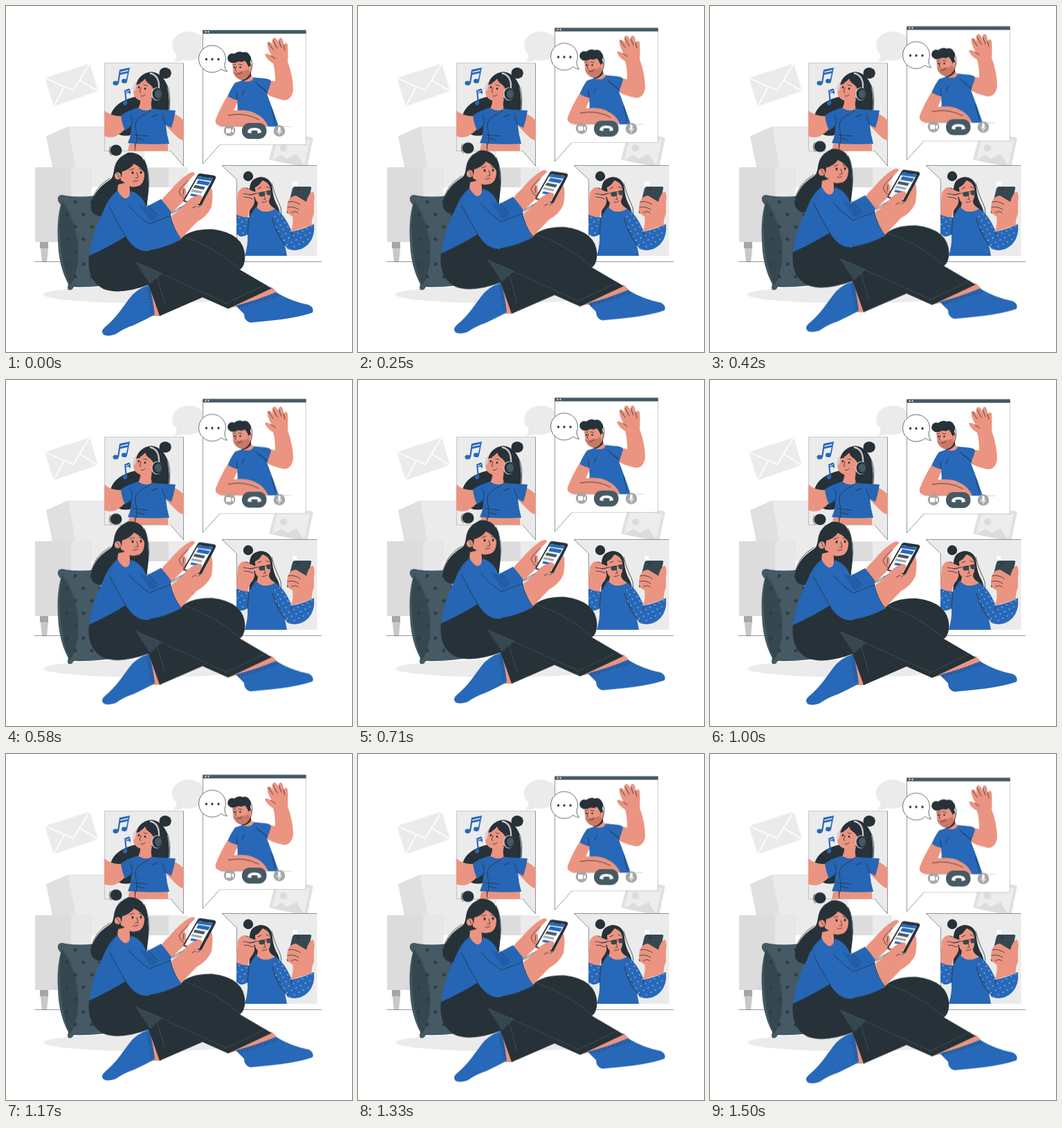
Write an HTML page that moves like this. It is 500 px wide and 500 px high and loops after 1.54 s.

```html
<!DOCTYPE html>
<html lang="en">
<head>
<meta charset="utf-8">
<title>Video chat</title>
<style>
html, body { margin: 0; width: 100%; height: 100%; overflow: hidden; background: #fff; }
svg { display: block; width: 100%; height: 100%; }
.blue { fill: #2768b8; }
.skin { fill: #eb9481; }
.ink { fill: #263238; }
.slate { fill: #37474f; }
.steel { fill: #455a64; }
.pale { fill: #ebebeb; }
.grey { fill: #e0e0e0; }
.mid { fill: #a6a6a6; }
.white { fill: #fff; }
.line { fill: none; stroke: #263238; stroke-width: .8; stroke-linecap: round; stroke-linejoin: round; }
.edge { fill: none; stroke: #263238; stroke-width: .5; }
.soft { fill: none; stroke: #263238; stroke-width: .5; opacity: .45; }
.light { fill: none; stroke: #fff; stroke-width: 1.6; }
.seam { fill: none; stroke: #455a64; stroke-width: .7; }
.rib { fill: none; stroke: #263238; stroke-width: 5; stroke-dasharray: .8 3; opacity: .7; }
</style>
</head>
<body>
<svg viewBox="0 0 500 500">
  <defs>
    <pattern id="stripes" width="6" height="4" patternUnits="userSpaceOnUse" patternTransform="rotate(-12)">
      <path d="M0 2H6" stroke="#174b8d" stroke-width=".6" opacity=".6"/>
    </pattern>
    <pattern id="spots" width="11" height="10" patternUnits="userSpaceOnUse" patternTransform="rotate(15)">
      <circle cx="3" cy="3" r=".75" fill="#fff"/><circle cx="8.5" cy="8" r=".75" fill="#fff"/>
    </pattern>
    <pattern id="dots" x="76" y="292" width="24" height="36" patternUnits="userSpaceOnUse">
      <circle cx="12" cy="9" r="2.6" fill="#2f3d45"/>
      <circle cx="0" cy="27" r="2.6" fill="#2f3d45"/><circle cx="24" cy="27" r="2.6" fill="#2f3d45"/>
    </pattern>
    <clipPath id="photoClip"><path d="M142 82H257V231L238 209.500H142Z"/></clipPath>
    <clipPath id="selfieClip"><path d="M333 230H450V361H333Z"/></clipPath>
  </defs>

  <!-- room -->
  <path class="pale" d="M56 104L121 83L133 123L69 145Z"/>
  <path class="light" d="M56 104L97 122L121 83M84 117L69 145M106 107L133 123"/>
  <path class="pale" d="M264 37C278 37 288 46 288 57C288 70 277 79 264 79L257 78Q250 81 242 81.500Q247 76 246.500 70Q240 65 240 57C240 46 250 37 264 37Z"/>
  <path class="pale" d="M90 174H200V233H101Z"/>
  <path class="grey" d="M58 188L90 174L101 233H67Z"/>
  <path class="pale" d="M94 233H263V262H94Z"/>
  <path fill="#dcdcdc" d="M42 233H94V341H42Z"/>
  <path fill="#e8e8e8" stroke="#dedede" stroke-width=".6" d="M94 234H123V341H94Z"/>
  <path fill="#dcdcdc" d="M195 234H235V262H195Z"/>
  <path class="mid" d="M49 341H61V350H49Z"/>
  <path fill="#c7c7c7" d="M50 350H61L59 370H52Z"/>
  <path class="grey" d="M391 181L444 190L435 234L380 222Z"/>
  <path fill="#ededed" d="M394 186L439 194L431 231L385 222Z"/>
  <path fill="#dcdcdc" d="M385 223L398 215L406 221L420 214L431 232Z"/>
  <circle cx="401" cy="205" r="5.200" fill="#dcdcdc"/>
  <path class="edge" d="M41 369.500H456"/>
  <ellipse class="pale" cx="205" cy="417" rx="151" ry="12.500"/>

  <!-- music photo -->
  <path class="pale" d="M142.500 82.500H256.500V231L238 209.500H142.500Z"/>
  <path class="soft" d="M238 209.500H142.500V82.500H256.500"/>
  <path class="edge" d="M256.500 82.500V231L238 209.500"/>
  <g clip-path="url(#photoClip)">
    <path class="ink" d="M188 112Q194 97 210 95Q227 97 233 116Q238 140 234 156L182 186Q170 190 160 184Q168 172 163 160Q156 158 151 158Q157 138 187 131Z"/>
    <ellipse class="ink" cx="230" cy="97" rx="8.500" ry="8"/>
    <path class="line" d="M222 104Q240 110 236 150M237 92Q240 99 236 103"/>
    <path class="skin" d="M142 151Q153 160 167 159L172 178Q164 186 157 189Q148 191 142 188Z"/>
    <path class="skin" d="M240 154Q253 160 257 166V194Q252 194 246 188L232 174Z"/>
    <path class="skin" d="M180 190H234V210H176Z"/>
    <path class="skin" d="M194 134L211 134Q208 143 212 150Q203 158 190 149Q195 143 194 134Z"/>
    <path id="crop" class="blue" d="M166 158Q176 151 191 147Q201 154 212 149L245 151Q243 164 239 176L231 172Q232 186 236 199Q206 201 176 198Q182 186 181 173L172 180Q167 169 166 158Z"/>
    <path fill="url(#stripes)" d="M166 158Q176 151 191 147Q201 154 212 149L245 151L239 176L231 172L236 199H176L181 173L172 180Z"/>
    <path class="line" d="M180 158Q184 166 181 174M226 158Q229 166 231 172M188 191L200 194M184 186L205 188M211 160L219 157M186 198L187 209"/>
    <path class="skin" d="M185 113Q193 104 204 103Q212 111 214 122Q213 136 202 138Q191 138 186 131Q182 122 185 113Z"/>
    <path class="ink" d="M188 114Q193 98 209 96Q219 102 219 121L214 124Q213 116 206 112Q202 109 201 105Q196 111 188 114Z"/>
    <ellipse cx="186" cy="117" rx="2" ry="6.500" fill="#d5d5d5" transform="rotate(12 186 117)"/>
    <path d="M208 97Q222 100 221 119" fill="none" stroke="#c7c7c7" stroke-width="2.400"/>
    <ellipse cx="218" cy="127" rx="8" ry="9.500" fill="#c7c7c7"/>
    <ellipse class="ink" cx="219" cy="127" rx="7.500" ry="8.800"/>
    <ellipse class="steel" cx="220" cy="127" rx="5" ry="6.300"/>
    <path class="line" d="M213 136Q215 151 197 158Q183 166 188 181Q191 192 186 205M195 118L193 124L195 125M195 130Q199 131 201 128M190 113L194 112M199 114L204 115"/>
    <circle class="ink" cx="192" cy="117.500" r="1.400"/><circle class="ink" cx="201" cy="119.500" r="1.400"/>
  </g>
  <g class="blue">
    <ellipse cx="158.500" cy="111.500" rx="4" ry="3.200"/><ellipse cx="171" cy="108.500" rx="4" ry="3.200"/>
    <path d="M161 111L164 92L179 89L175 109H173L175.800 97L165 99.500L163 112Z"/>
    <path d="M165 96.600L176.300 94L176.800 92.300L165.500 95Z" fill="#ebebeb"/>
    <ellipse cx="172" cy="140.500" rx="3" ry="3"/>
    <path d="M172.800 140L171 122L178 119Q181 123 179.500 128Q178 124 173.500 126L175 140Z"/>
    <path d="M172.500 124L178 121.800V122.800L172.700 125Z" fill="#ebebeb"/>
  </g>

  <!-- call window -->
  <g class="float">
    <path class="white" d="M284.500 35H433.500V200.500H309L284.500 228Z"/>
    <path class="soft" d="M433.500 35V200.500H309"/>
    <path class="edge" d="M309 200.500L284.500 228V35"/>
    <path class="steel" d="M284.300 34.700H433.700V40H284.300Z"/>
    <circle class="white" cx="288.500" cy="37.300" r="1.100"/><circle class="white" cx="292.500" cy="37.300" r="1.100"/>
    <path class="skin" d="M379 107L389 109Q389 92 386 83Q377 78 374 70Q376 67 384 72Q376 58 378 53Q382 50 386 57Q383 48 387 46Q391 45 394 54Q393 45 398 46Q401 49 401 56Q405 51 407 56Q408 70 407 80Q415 102 415 122Q412 137 401 136Q386 133 376 127Z"/>
    <path class="line" d="M379 53L386 63M386 50L392 61M394 50L398 60M401 56L403 64M383 72L389 76"/>
    <path class="blue" d="M331 111Q342 107 356 103L376 105Q383 106 383 110Q380 120 377 127Q386 150 394 174H332Q336 155 334 137Q327 135 320 131Q325 119 331 111Z"/>
    <path class="skin" d="M320 130Q327 135 335 136Q332 146 329 151Q350 149 362 156Q373 161 379 174H312Q301 172 303 164Q310 146 320 130Z"/>
    <path class="skin" d="M341 98L354 92Q353 101 358 104Q354 112 342 108Z"/>
    <path class="ink" d="M340 106Q349 104 354 96V101Q348 109 341 108Z"/>
    <path class="skin" d="M327 80Q340 75 352 82L354 94Q350 106 340 107Q331 105 328 95Z"/>
    <path d="M328 95Q334 97 340 94Q347 95 351 90L353 96Q349 107 340 107Q331 104 328 95Z" fill="#c97966"/>
    <path class="ink" d="M325 82Q318 78 321 72Q324 67 330 69Q336 64 342 67Q349 65 352 71Q356 75 353 81L355 88L351 92Q350 84 345 79Q341 82 336 80Q331 83 325 82Z"/>
    <path class="skin" d="M350 89Q352 85 355 87Q356 92 351 95Z"/>
    <path class="line" d="M333 87L331 93L333 94M334 98Q337 99 341 96M328 85L332 84M336 84L341 85M355 78Q357 90 353 97M365 115Q372 118 378 126M361 111L377 124M333 125L334 136M321 158Q345 153 365 164M384 149L389 170M345 121L341 128"/>
    <circle class="ink" cx="330" cy="88.500" r="1.300"/><circle class="ink" cx="338.500" cy="88.500" r="1.300"/>
    <path class="soft" d="M310 174.300H412"/>
    <circle class="mid" cx="323" cy="180" r="8.300"/><circle class="mid" cx="395" cy="180.500" r="8.300"/>
    <rect class="steel" x="341" y="169" width="35.500" height="23" rx="11"/>
    <path class="white" d="M318 177H325V183.500H318ZM326 179L329 177V183.500L326 181.500Z"/>
    <rect class="white" x="393.200" y="174.500" width="3.600" height="8" rx="1.800"/>
    <path d="M391.500 180Q392 184 395 184Q398 184 398.500 180M395 184V186.500" fill="none" stroke="#fff" stroke-width=".9"/>
    <path class="white" d="M349 183Q349 176 359 176Q369 176 369 183L363.500 184V180.500Q359 179 354.500 180.500V184Z"/>
    <path class="white" stroke="#263238" stroke-width=".7" d="M311 91A19.500 19.500 0 1 1 316 84Q315.500 90 319.500 94.500Q314 94 311 91Z"/>
    <circle class="ink" cx="289.500" cy="77" r="1.700"/><circle class="ink" cx="298" cy="77" r="1.700"/><circle class="ink" cx="307" cy="77" r="1.700"/>
  </g>

  <!-- selfie -->
  <path class="pale" d="M312 230.500H449.500V361H333.500V251Z"/>
  <path class="edge" d="M333.500 361V251L312 230.500H449.500"/>
  <g clip-path="url(#selfieClip)">
    <circle class="ink" cx="350" cy="246" r="7.200"/>
    <path class="ink" d="M352 265Q352 249 368 247Q384 248 385 265Q386 278 393 290Q399 302 392 314L354 320Q349 300 354 290Z"/>
    <path class="line" d="M384 256Q389 275 395 286Q401 298 394 312"/>
    <path class="skin" d="M364 280H380Q379 288 389 293L376 309L355 300Q365 293 364 280Z"/>
    <path class="blue" d="M333 301L351 306L361 290Q372 303 389 293Q402 300 413 326Q432 322 445 315Q447 333 437 344Q424 357 407 351L403 345L406 361H345Q350 345 349 330Q340 337 333 329Z"/>
    <path fill="url(#spots)" d="M333 303L349 308L346 330Q339 335 333 328ZM389 297Q403 302 413 327L444 317Q446 333 436 343Q424 356 407 350Q390 330 385 307Z"/>
    <path class="line" d="M385 308Q392 334 404 346M351 306L349 330M412 326L414 334M389 322L398 333"/>
    <path class="skin" d="M359 261Q366 257 371 252Q380 255 382 264Q384 282 375 286Q364 289 360 278Z"/>
    <path class="ink" d="M354 270Q356 251 371 249Q368 259 360 262V277L355 288Z"/>
    <path class="skin" d="M335 270Q341 259 348 263L353 266L366 271Q366 276 358 276Q362 284 354 293Q350 299 350 305Q341 306 333 301Z"/>
    <path class="line" d="M343 271L355 273L360 271M344 276Q352 276 357 279M347 263L361 267M373 274L375 279L372 280M370 284Q374 284 377 282M364 264L369 262M376 261L380 263"/>
    <ellipse class="slate" cx="370" cy="272" rx="4.600" ry="3.400" transform="rotate(-10 370 272)"/>
    <ellipse class="slate" cx="380" cy="270" rx="3.600" ry="3.400"/>
    <path class="line" d="M352 273L366 270L383 267"/>
    <path class="slate" d="M418 261H439Q442 261 441 264L434 298Q433 300 430 300H408Q405 299 406 296L414 264Q415 261 418 261Z"/>
    <path class="white" d="M414 254H421V260L415 261Z"/>
    <circle class="ink" cx="422" cy="265" r="1.500"/>
    <path class="skin" d="M407 284Q411 274 419 274L434 283Q437 271 443 268Q447 272 445 284V300Q441 309 442 317L412 326Q416 312 414 304Q405 300 406 292Z"/>
    <path class="line" d="M408 283Q417 281 425 287M407 291Q416 289 423 294M412 299Q418 295 422 299"/>
  </g>

  <!-- cushion -->
  <path class="steel" d="M75 277Q77 271 86 274Q106 277 130 274L165 400Q135 407 98 406Q95 412 90 410Q88 407 90 402Q76 376 75 340Q73 310 79 287Q74 282 75 277Z"/>
  <path class="slate" d="M81 282Q76 305 78 335Q80 373 92 405Q105 385 104 355Q102 310 81 282Z"/>
  <path fill="url(#dots)" d="M80 284Q106 280 130 276L160 400H96Q77 370 76 330Z"/>
  <path class="soft" d="M80 279Q104 307 104 352Q104 386 92 407"/>

  <!-- texting girl -->
  <g class="float">
    <path class="skin" d="M205 403L213 404L224 448L212 448Z"/>
    <path class="blue" d="M207 403Q188 409 178 423L164 442Q154 455 143 464Q136 470 141 475Q146 478 158 474.500Q170 466 185 461Q200 454 215 446Q212 420 207 403Z"/>
    <path class="rib" d="M206 408L212 443"/>
    <path class="skin" d="M320 437L384 406L392 414L336 434Z"/>
    <path class="blue" d="M332 433Q360 426 390 413.500Q412 427 438 432Q446 437 443 443Q420 452 353 457.500Q344 455 344 445Z"/>
    <path class="rib" d="M337 434.500L393 417"/>
    <path class="ink" d="M120 360L172 330L203 354L252 337Q264 322 298 322.500Q344 328 345.500 362Q345 377 338 381L384 408L321 437.500L284 421L222 448Q214 425 206 403Q165 418 141 409Q116 396 120 360Z"/>
    <path class="slate" d="M187 370L226 386L208 402Z"/>
    <path class="seam" d="M187 370L320 430M218 390L230 432M256 333Q300 347 338 380M316 431L376 402"/>

    <path class="ink" d="M166 218C151 231 160 246 149 252Q124 268 122.500 292Q125 304 140 304L160 280L203 290Q209 258 203 230Q195 210 176 212Z"/>
    <ellipse class="ink" cx="159" cy="208.500" rx="8.500" ry="8"/>
    <path class="line" d="M151 203Q147 210 152 216M200 222Q209 243 205.500 268Q203 285 196 298M150 249Q128 262 123 284"/>
    <path class="skin" d="M222 284Q228 275 237 267Q251 250 266 241Q273 239 273 243L264 252L257 262Q263 272 258 281L238 300Z"/>
    <path class="blue" d="M162 266Q148 276 140 298Q124 330 120 361Q147 349 173 333Q186 354 202 354Q230 350 254 337Q242 322 238 303L239 298Q232 288 224 279L203 290Q196 270 181 265Q179 281 162 266Z"/>
    <path fill="url(#stripes)" d="M160 268Q147 280 140 298Q124 330 120 360Q148 348 172 332L150 291ZM204 291L224 280L238 300L211 308Z"/>
    <path class="ink" d="M180 260L204 255Q206 275 203 291Q198 273 180 267Z"/>
    <path d="M192 287L204 291L219 306L209 311Z" fill="#174b8d" opacity=".35"/>
    <path class="line" d="M150 291Q160 312 173 333M178 289Q188 302 207 315L238 303M202 285L218 302M240 298L253 290M238 304Q242 322 253 336"/>
    <path class="skin" d="M162 258L178 254L179 266Q180 278 172 278Q166 276 161 266Z"/>
    <path class="skin" d="M165 238Q176 232 184 224Q197 224 200 238Q201 256 192 260Q180 264 174 257L166 252Z"/>
    <path class="ink" d="M160 247Q157 222 174 213.500Q187 211 196 218Q203 228 202 246Q198 234 185 228Q178 237 168 239L167 247Z"/>
    <ellipse class="skin" cx="161.500" cy="245.500" rx="4.600" ry="5.300"/>
    <path class="line" d="M160 242Q164 244 163 248M189 241L191 248L187 249M184 253Q187 254 191 252M179 237L185 235M192 235L197 237"/>
    <ellipse class="ink" cx="183" cy="241" rx="1.500" ry="2"/><ellipse class="ink" cx="195" cy="240.500" rx="1.500" ry="2"/>

    <path class="ink" d="M281 242L301 245Q304 246 303 249L285 285Q283 289 279 288L258 283Q255 282 257 279L277 244Q278 242 281 242Z"/>
    <path class="white" d="M278 246L299 249L279 286L258 281Z"/>
    <path class="blue" d="M278 246L299 249L296.500 253L275.500 250Z"/>
    <path class="ink" d="M285 244.500L293 245.700L292 248L284 247Z"/>
    <path class="blue" d="M278 251.500L295 254.500L292 259.500L275 256.500Z"/>
    <path class="steel" d="M273 258.500L288 261.500L285.500 265.500L270.500 262.500Z"/>
    <path class="mid" d="M269 265L284 268L282 271L267 268Z"/>
    <path class="blue" d="M268 271L282 274L280 277L266 274Z"/>
    <path class="skin" d="M251 266Q257 259 260 265Q261 270 257 278Q251 276 250 270Z"/>
    <path class="line" d="M264 252Q253 261 250 268Q252 274 257 278M257 264L256 273"/>
    <path class="skin" d="M239 303Q252 295 261 283Q270 274 281 273Q286 276 281 282L275 289L283 287Q292 269 297 262Q300 271 297 290Q291 304 276 312L253 336Q242 322 239 303Z"/>
    <path class="line" d="M240 300Q249 296 257 288M275 289L269 292M283 287L277 291"/>
  </g>
</svg>
<script>
const LOOP = 1540;
const RISE = 10;
const steps = [0, -RISE, 0].map(y => ({ transform: `translateY(${y}px)` }));

for (const part of document.querySelectorAll('.float')) {
  const motion = part.animate(steps, { duration: LOOP, iterations: Infinity, easing: 'linear' });
  motion.startTime = document.timeline.currentTime;
}
</script>
</body>
</html>
```
